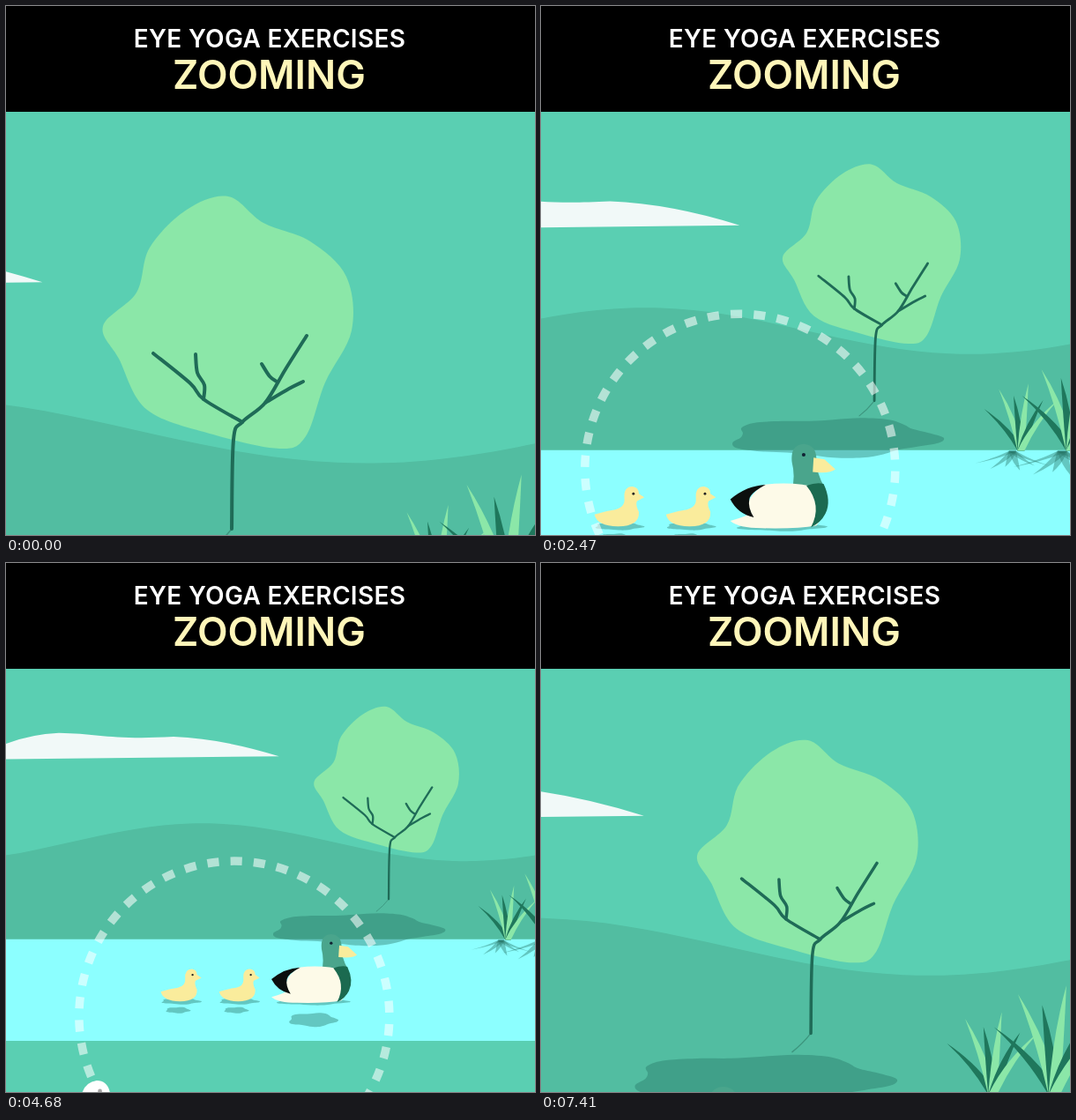
An HTML page for the animation above (7.54 s loop, 600x600 px).

```html
<!DOCTYPE html>
<html lang="en">
<head>
<meta charset="utf-8">
<title>Eye yoga: zooming</title>
<style>
  html, body { margin: 0; width: 100%; height: 100%; overflow: hidden; background: #5acfb2; }
  svg { display: block; width: 100vw; height: 100vh; }
  text { font-family: Inter, "Open Sans", sans-serif; font-weight: 600; text-anchor: middle; }
</style>
</head>
<body>
<svg viewBox="0 0 600 600">
  <rect width="600" height="600" fill="#5acfb2"/>
  <g id="scene"></g>
  <circle id="ring" r="176" fill="none" stroke="#fff" stroke-width="9.5" pathLength="42" stroke-dasharray=".5 .5"/>
  <rect width="600" height="120"/>
  <text x="299" y="47" font-size="28" letter-spacing=".3" fill="#fff">EYE YOGA EXERCISES</text>
  <text x="298.5" y="94" font-size="45" fill="#fff6b9">ZOOMING</text>
</svg>
<script>
const LIGHT = '#8be7a8', DARK = '#1f775c', TRUNK = '#1f6b57', CREAM = '#fdfae8',
      YELLOW = '#faec9c', CLOUD = '#f1f9f8', SHADE = 'rgba(38,116,100,.4)';
const FOCUS = [679, 90]; // the zoom keeps this point still

// Everything drawn inside view(w) uses stage coordinates as seen at view size w.
const zoom = k => `translate(${FOCUS}) scale(${k}) translate(${-FOCUS[0]} ${-FOCUS[1]})`;
const view = (w, ...parts) => `<g transform="${zoom(w)}">${parts.join('')}</g>`;
const place = (transform, s) => `<g transform="${transform}">${s}</g>`;
const fill = (d, color) => `<path d="${d}" fill="${color}"/>`;
const line = (d, color, width) =>
  `<path d="${d}" fill="none" stroke="${color}" stroke-width="${width}" stroke-linecap="round" stroke-linejoin="round"/>`;
const oval = (x, y, rx, ry, color) => `<ellipse cx="${x}" cy="${y}" rx="${rx}" ry="${ry}" fill="${color}"/>`;
const repeat = (n, make) => Array.from({ length: n }, (_, i) => make(i));
const points = text => text.split(' ').map(p => p.split(',').map(Number));

// Smooth path through a list of points.
function curve(p, closed) {
  const n = p.length;
  const at = i => closed ? p[(i + n) % n] : p[Math.max(0, Math.min(n - 1, i))];
  let d = 'M' + p[0];
  for (let i = 0; i < (closed ? n : n - 1); i++) {
    const [a, b, c, e] = [at(i - 1), at(i), at(i + 1), at(i + 2)];
    d += `C${[0, 1].map(k => b[k] + (c[k] - a[k]) / 6)} ${[0, 1].map(k => c[k] - (e[k] - b[k]) / 6)} ${c}`;
  }
  return d + (closed ? 'Z' : '');
}
const blob = (text, color) => fill(curve(points(text), true), color);

// Flat shadow with a wavy edge.
const puddle = (x, y, rx, ry) => fill(curve(repeat(24, i => {
  const a = i * Math.PI / 12, r = 1 + .1 * Math.sin(5 * a + 1);
  return [x + rx * r * Math.cos(a), y + ry * r * Math.sin(a)];
}), true), SHADE);

// Grass: blades fan out from one foot, dark and light in turn.
const tuft = (x, y, size, tint) => repeat(6, i => {
  const lean = -1 + .4 * i, h = size * (i % 2 ? 95 : 78) * (1 - .25 * lean * lean);
  const dx = size * 52 * lean, half = size * 5, cx = x + dx * .35, cy = y - h * .55;
  return fill(`M${x - half} ${y}Q${cx - half} ${cy} ${x + dx} ${y - h}Q${cx + half} ${cy} ${x + half} ${y}Z`,
    tint || (i % 2 ? LIGHT : DARK));
}).join('');

// Feathered leaf along a bent stem.
function frond(x0, y0, cx, cy, x1, y1, size, color) {
  const n = 9;
  let d = '';
  for (let i = 0; i <= n; i++) {
    const u = .1 + .9 * i / n, v = 1 - u;
    const x = v * v * x0 + 2 * v * u * cx + u * u * x1, y = v * v * y0 + 2 * v * u * cy + u * u * y1;
    const dir = Math.atan2(v * (cy - y0) + u * (y1 - cy), v * (cx - x0) + u * (x1 - cx));
    const length = size * (1 - .5 * u);
    for (const side of i < n ? [-1, 1] : [0]) {
      const to = (r, turn) => `${x + r * Math.cos(dir + side * .75 + turn)} ${y + r * Math.sin(dir + side * .75 + turn)}`;
      d += `M${x} ${y}Q${to(length * .65, -.45)} ${to(length, -side * .15)}Q${to(length * .65, .4)} ${x} ${y}`;
    }
  }
  return line(`M${x0} ${y0}Q${cx} ${cy} ${x1} ${y1}`, color, 2) + fill(d, color);
}

// Spiky half-round bush.
const bush = (x, y, rx, ry, color) => fill('M' + repeat(27, i => {
  const a = Math.PI * (1 - i / 26), r = i % 2 ? 1 : .72;
  return [x + rx * r * Math.cos(a), y - ry * r * Math.sin(a)];
}).join(' ') + 'Z', color);

const hillTop = repeat(38, i => {
  const x = i * 20 - 40;
  return [x, 243.5 - 14.5 * Math.cos((x - 370) * 2 * Math.PI / 406)];
});
const land = view(1,
  fill('M-40 100H80Q104 117 114 126Q128 137 145 145L-40 147Z', CLOUD),
  fill('M195 180Q225 161 260 159.5C290 160 300 165 348 162.5Q386 164 429 177.5Z', CLOUD),
  fill(curve(hillTop) + 'V319H-40Z', '#52bda1'),
  fill('M-40 318H700V396H-40Z', '#8cffff'));

const branches = ['256,593 258,492 268,472 294,450 317,412 341,374', '268,472 224,446 209,428 167,394',
  '224,446 225,430 217,416 215,395', '307,426 299,420 290,406', '294,450 321,434 337,426'];
const tree = view(.566, puddle(341, 479, 112, 21)) + view(.392,
  line('M256 593Q245 607 232 617', '#3d957e', 1.5),
  blob('252,216 292,246 345,267 386,307 392,368 362,427 340,488 310,502 235,486 160,458 128,400 110,363 ' +
    '148,325 163,274 205,231', LIGHT),
  branches.map(b => line(curve(points(b)), TRUNK, 4)).join(''));

const tufts = tint => tuft(512, 604, 1, tint) + tuft(582, 604, 1.32, tint);
const plants = view(.444, place('translate(-12 780) scale(1 -.29)', tufts(SHADE)), tufts()) +
  view(1, oval(10, 319, 34, 6, SHADE), bush(21, 318, 27, 29, DARK), bush(2, 318, 34, 27, LIGHT));

const duckling = puddle(104, 577, 26, 4) + puddle(100, 589, 16, 4) +
  fill('M77 564Q88 560 100 558.5Q111 556 110 546Q109 533 119 533Q126 534 126 541L132 545L124 549' +
    'Q122 553 126 561Q127 577 103 577Q80 577 77 564Z', YELLOW) +
  oval(120, 541, 1.4, 1.4, '#222');
const ducks = view(.566, duckling, place('translate(79)', duckling),
  puddle(282, 577, 48, 5), puddle(283, 602, 32, 9),
  fill('M295 536Q299 522 295 506Q293 487 308 486Q321 487 322 501Q321 516 331 534L322 546Z', '#4aa58c'),
  fill('M319 501L331 503L343 514Q337 519 318 517Z', YELLOW), oval(308, 498, 2, 2, '#123'),
  fill('M227 571Q245 566 250 562Q240 548 264 531Q298 527 325 535Q336 560 322 576Q300 580 262 579Q236 579 227 571Z', CREAM),
  fill('M227 547Q245 532 266 531Q249 540 248 547Q246 556 253 567Q235 563 227 547Z', '#0c0f0e'),
  fill('M311 532Q322 528 330 530Q339 549 332 563Q327 573 316 578Q329 554 311 532Z', '#1b6a50'));

const leg = (x, y) => line(`M${x} ${y}L${x + 3} 525M${x - 6} 527L${x + 11} 525.5`, '#fff', 2.4);
const birds = view(1,
  blob('170,542 225,541 263,527 246,541 240,560 185,592 171,590 188,575', SHADE),
  fill('M270 543H356L331 566L317 584L296 571L306 557Z', SHADE),
  fill('M264 541.5Q280 538 289 532Q301 525 316 533Q340 527 354 541.5Z', '#f9f0b4'),
  fill('M305 438L299 435Q297 426.5 289 426.5Q279 428 277 439Q274 453 260 462Q243 471 234 481L195 499L200 504' +
    'L226 503Q241 510 262 510Q285 502 293 488Q299 470 295 451Q295 443 299 440Z', '#fff'),
  leg(260, 508), oval(291.5, 434.5, 1.6, 1.6, '#333'),
  fill('M411 443L407 457Q391 477 392 489Q391 508 377 518Q352 524 333 515Q327 512 323 515L319 522L317 515' +
    'Q309 507 314 499Q320 494 330 494Q346 485 354 473Q364 464 380 461L404 447Z', '#fff'),
  leg(372, 514), oval(320.5, 506, 1.6, 1.6, '#333'));

const palm =
  frond(-22, 530, -4, 482, 24, 450, 33, DARK) + frond(-14, 526, 10, 480, 54, 454, 33, LIGHT) +
  frond(-25, 570, 35, 520, 97, 530, 45, DARK) + frond(-20, 640, 30, 605, 80, 620, 40, DARK) +
  frond(-25, 614, 35, 564, 100, 584, 46, LIGHT);
const palms = view(1, palm, place('translate(596) scale(-1 1)', palm));

const scene = document.getElementById('scene'), ring = document.getElementById('ring');
scene.innerHTML = land + tree + plants + ducks + birds + palms;

const LOOP = 7540;
const linear = u => u, smooth = u => u * u * (3 - 2 * u);
// [time, view size, easing into this key]
const camera = [[0, .392], [1600, .411, linear], [2400, .55, smooth], [4430, .58, linear],
  [5230, .995, smooth], [6760, 1.02, linear], [7552, .392, smooth]];
// [view size, ring centre in the scene]
const route = [[.416, 513, 215.5], [.566, 420, 342.5], [1.02, 316, 484]];

function sample(keys, x, column, ease) {
  const found = keys.findIndex(k => k[0] >= x), i = found < 0 ? keys.length - 1 : Math.max(1, found);
  const [a, b] = [keys[i - 1], keys[i]];
  const u = Math.max(0, Math.min(1, (x - a[0]) / (b[0] - a[0])));
  return a[column] + (b[column] - a[column]) * (ease || b[2])(u);
}
const ramp = (t, from, to) => Math.max(0, Math.min(1, (t - from) / (to - from)));

function draw(now) {
  const t = Math.max(0, now) % LOOP, w = sample(camera, t, 1);
  scene.setAttribute('transform', zoom(1 / w));
  const [x, y] = FOCUS.map((f, k) => f + (sample(route, w, k + 1, linear) - f) / w);
  const turn = -90 - 90 / 42 - 3.75 + .964 * t / 1000;
  ring.setAttribute('transform', `translate(${x} ${y}) rotate(${turn})`);
  ring.setAttribute('opacity', .56 * ramp(t, 400, 800) * (1 - ramp(t, 6800, 7100)));
  requestAnimationFrame(() => draw(performance.now() - start));
}
const start = performance.now();
draw(0);
</script>
</body>
</html>
```
